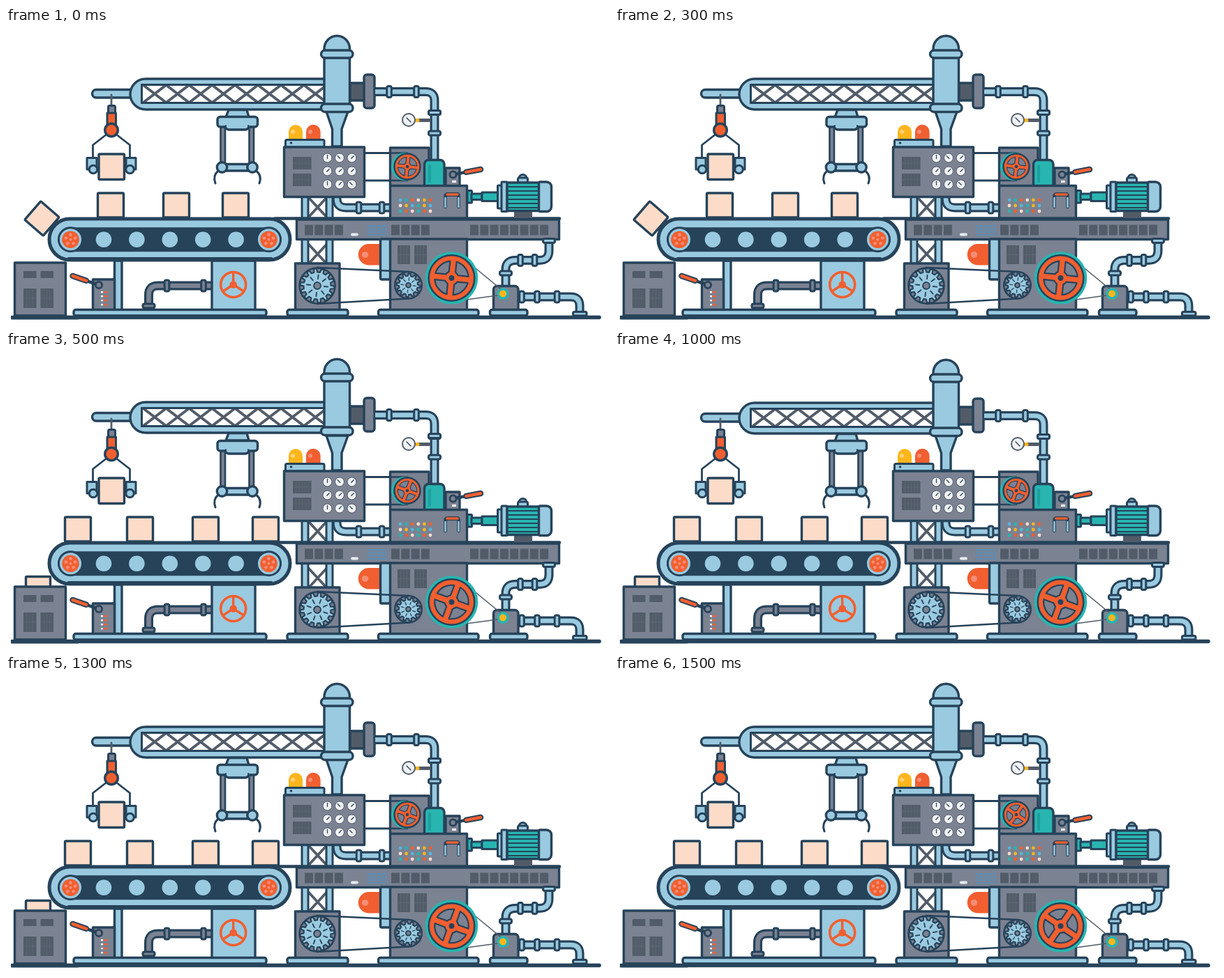
An HTML page with a canvas that plays this animation: 864x425 px, repeating every 2 s.

```html
<!DOCTYPE html>
<html lang="en">
<head>
<meta charset="utf-8">
<title>Conveyor machine</title>
<style>
html, body { margin: 0; width: 100%; height: 100%; overflow: hidden; background: #fff; }
canvas { display: block; }
</style>
</head>
<body>
<canvas id="stage" width="864" height="425"></canvas>
<script>
const ctx = document.getElementById('stage').getContext('2d');
const NAVY = '#26435a', BLUE = '#9acae0', GREY = '#7b8292', DARK = '#525c69',
  ORANGE = '#f15f30', PEACH = '#fcdcc9', TEAL = '#28b5b0', YELLOW = '#fcb61c',
  PINK = '#f58d76', WHITE = '#fff';
const TAU = Math.PI * 2;

function paint(path, fill, stroke = NAVY, width = 3.4) {
  if (fill) { ctx.fillStyle = fill; ctx.fill(path); }
  if (stroke) { ctx.strokeStyle = stroke; ctx.lineWidth = width; ctx.stroke(path); }
}
const shape = (d, ...style) => paint(new Path2D(d), ...style);
const line = (d, color = NAVY, width = 3) => shape(d, null, color, width);
// Corner-to-corner box; the corners are the outline's centre line.
function box(x1, y1, x2, y2, fill, radius = 0, ...style) {
  const p = new Path2D();
  p.roundRect(x1, y1, x2 - x1, y2 - y1, radius);
  paint(p, fill, ...style);
}
const flat = (x1, y1, x2, y2, fill, radius = 0) => box(x1, y1, x2, y2, fill, radius, null);
function disc(x, y, r, fill, ...style) {
  const p = new Path2D();
  p.arc(x, y, r, 0, TAU);
  paint(p, fill, ...style);
}
const dot = (x, y, r, fill) => disc(x, y, r, fill, null);
function pipe(d, fill = BLUE, width = 13) {
  ctx.lineCap = 'butt';
  line(d, NAVY, width);
  line(d, fill, width - 6.4);
  ctx.lineCap = 'round';
}
// Pipe collars: upright on a level run, level on an upright run.
const collarV = (x, y, fill = BLUE) => box(x - 3.3, y - 8, x + 3.3, y + 8, fill, 2.5, NAVY, 3);
const collarH = (x, y, fill = BLUE) => box(x - 8.5, y - 3, x + 8.5, y + 3, fill, 2.5, NAVY, 3);
function at(x, y, angle, draw) {
  ctx.save();
  ctx.translate(x, y);
  ctx.rotate(angle * Math.PI / 180);
  draw();
  ctx.restore();
}
function vents(x, y, count, w = 12, h = 15, step = 14.3) {
  for (let i = 0; i < count; i++) flat(x + i * step, y, x + i * step + w, y + h, DARK);
}
function grille(x1, y1, x2, y2) {
  flat(x1, y1, x2, y2, DARK);
  for (let x = x1 + 4.5; x < x2 - 2; x += 4.5) line(`M${x} ${y1 + 1}V${y2 - 1}`, '#626b78', .7);
  const mid = (y1 + y2) / 2;
  line(`M${x1} ${mid}H${x2}`, '#626b78', .7);
}

function spokeWheel(x, y, r, angle) {
  disc(x, y, r, ORANGE, NAVY, 2.5);
  at(x, y, angle, () => {
    for (let i = 0; i < 4; i++) {
      const a = i * TAU / 4, p = new Path2D();
      p.arc(0, 0, r * .74, a + .19, a + TAU / 4 - .19);
      p.arc(0, 0, r * .3, a + TAU / 4 - .5, a + .5, true);
      p.closePath();
      paint(p, GREY, NAVY, r * .065);
    }
  });
  dot(x, y, r * .12, NAVY);
}
function gear(x, y, r, teeth, angle) {
  at(x, y, angle, () => {
    const p = new Path2D();
    for (let i = 0; i < teeth; i++) {
      const a = i * TAU / teeth, s = TAU / teeth;
      [[-.28, .8], [-.18, 1], [.18, 1], [.28, .8]].forEach(([k, q]) =>
        p.lineTo(Math.cos(a + k * s) * r * q, Math.sin(a + k * s) * r * q));
    }
    p.closePath();
    paint(p, BLUE, NAVY, 2.2);
    for (let i = 0; i < 8; i++) {
      const a = i * TAU / 8, c = Math.cos(a), s = Math.sin(a);
      line(`M${c * r * .4} ${s * r * .4}L${c * r * .63} ${s * r * .63}`, NAVY, r * .075);
    }
    disc(0, 0, r * .2, GREY, NAVY, 2);
  });
}
function carton(x, y, w = 37, h = 35) { box(x, y, x + w, y + h, PEACH, 1.5); }
function lever(x, y, tipX, tipY) {
  const mx = x + (tipX - x) * .48, my = y + (tipY - y) * .48;
  line(`M${x} ${y}L${mx} ${my}`, NAVY, 4.5);
  line(`M${mx} ${my}L${tipX} ${tipY}`, NAVY, 8.5);
  line(`M${mx} ${my}L${tipX} ${tipY}`, ORANGE, 4.5);
  disc(x, y, 4.6, GREY, NAVY, 2.8);
}

function crane() {
  box(123.5, 88.5, 190, 100, BLUE, 6);
  box(178, 73, 458, 117, BLUE, [22, 0, 0, 22]);
  box(194.5, 81.5, 458, 107.5, WHITE, 0, NAVY, 3);
  for (let x = 213; x < 450; x += 32.9) {
    line(`M${x - 15} 83L${x + 15} 106M${x + 15} 83L${x - 15} 106`, DARK, 4);
  }
  line('M194.5 81.5H456M194.5 107.5H456');
  shape('M319 117.5H345L348 128H315Z', BLUE);

  box(493, 79, 514, 104, DARK);
  box(513, 67, 528, 115, GREY, 4);
  shape('M456 34V30A18 18.5 0 0 1 492.5 30V34Z', BLUE);
  box(456, 42, 492.5, 110, BLUE);
  box(451.5, 32, 497, 43, BLUE, 5.5);
  pipe('M529 91.5H601Q614 91.5 614 104V124');
  collarV(549, 91.5);
  collarV(588, 91.5);
}
function gripper() {
  for (const x of [307.5, 348.5]) box(x, 142, x + 6.5, 194, GREY, 0, NAVY, 2.6);
  box(303, 127.5, 360.5, 142, BLUE, 4);
  shape('M315 141V143Q316 146 320 146H343Q347 146 347 141', BLUE);
  flat(316, 138, 346, 143, BLUE);
  box(313, 195.5, 349, 205, BLUE);
  disc(309.5, 200, 7.2, BLUE);
  disc(353, 200, 7.2, BLUE);
  line('M304 205Q296 212 300 223M358.5 205Q367 212 363 223');
}
function hook() {
  line('M151 96V113', DARK, 2.8);
  line('M145 152L124.5 168V187M157 152L177.5 168V187', NAVY, 2.8);
  box(146.5, 111.5, 156.5, 124, GREY, 2, NAVY, 3);
  box(145, 122, 157.5, 142, ORANGE, 0, NAVY, 3);
  disc(151, 146.5, 9.3, ORANGE);
  box(116, 186.5, 130, 203, BLUE, 0, NAVY, 3);
  box(172, 186.5, 186, 203, BLUE, 0, NAVY, 3);
  disc(125, 203, 5.8, BLUE, NAVY, 3);
  disc(177.5, 203, 5.8, BLUE, NAVY, 3);
  carton(133, 181, 36.5, 36.5);
}

function conveyor() {
  box(62, 274, 407, 333, BLUE, 29.5, NAVY, 5);
  line('M90 331.5H380', NAVY, 5);
  box(76, 288, 393, 319.5, NAVY, 16);
  for (let i = 0; i < 5; i++) dot(140 + i * 47.4, 303.7, 11.3, BLUE);
  for (const x of [92.5, 376.5]) {
    disc(x, 303.7, 17, BLUE, NAVY, 3);
    dot(x, 303.7, 12.3, ORANGE);
    for (let i = 0; i < 5; i++) {
      const a = i * TAU / 5 - TAU / 4;
      dot(x + Math.cos(a) * 7, 303.7 + Math.sin(a) * 7, 2.4, PINK);
    }
    dot(x, 303.7, 2, PINK);
  }
}
function conveyorStand() {
  box(155.5, 334, 166, 405, BLUE);
  box(124.5, 361, 155.5, 405, GREY);
  for (let y = 378; y < 400; y += 6) {
    flat(136, y, 139, y + 2.4, WHITE);
    flat(140, y, 145, y + 2.4, ORANGE);
  }
  lever(133, 369, 95.5, 356);
  pipe('M295 370H218Q204.5 370 204.5 383V404', GREY);
  collarV(230.5, 370, GREY);
  collarV(283, 370, GREY);
  collarH(204.5, 399, GREY);
  box(295, 334, 357, 405, BLUE);
  disc(325.7, 368.5, 18, null, ORANGE, 3.6);
  line('M325.7 368.5V351M325.7 368.5L311 378M325.7 368.5L340.5 378', ORANGE, 3.5);
  dot(325.7, 368.5, 5.2, ORANGE);
  box(97, 404.5, 373, 413, BLUE, 3);
}
function cabinet() {
  box(12.5, 337, 85.5, 413, GREY);
  for (const x of [25, 49.5]) {
    flat(x, 349, x + 18.5, 359, DARK);
    grille(x, 374, x + 18.5, 402);
  }
}

function controlTower(angle) {
  for (const y of [244, 311]) line(`M434 ${y}L459 ${y + 27}M459 ${y}L434 ${y + 27}`, DARK, 3.8);
  box(424, 242, 433, 340, BLUE, 0, NAVY, 3);
  box(459, 242, 468, 340, BLUE, 0, NAVY, 3);
  pipe('M474 240V245Q474 258 487 258H552');
  collarV(505.5, 258);
  collarV(538.5, 258);

  shape('M459 120H490L481 145V170H467.5V145Z', BLUE);
  shape('M405 161V149A10 10 0 0 1 425 149V161Z', YELLOW, null);
  shape('M430 161V149A10.3 10.3 0 0 1 450.6 149V161Z', ORANGE, null);
  dot(411, 149, 3, '#fdd276');
  dot(436, 149, 3, PINK);
  box(400.5, 160.5, 456, 171, BLUE, 2, NAVY, 3);
  dot(408.5, 165, 1.8, NAVY);
  box(398.5, 171, 513.5, 242.5, GREY);
  grille(411, 185, 437.5, 203);
  grille(411, 209, 437.5, 227);
  for (let i = 0; i < 9; i++) {
    const x = 460.5 + i % 3 * 17.5, y = 186.5 + Math.floor(i / 3) * 19;
    disc(x, y, 6.5, '#f0f2f4', DARK, 1);
    at(x, y, [0, -45, 45, 40, 45, 45, 0, 40, -45][i], () => line('M0 1V-4', NAVY, 1.3));
  }
  box(414.5, 338, 478, 405, GREY);
  box(403, 404.5, 490, 413, BLUE, 3);
  disc(446, 370, 25.5, null, NAVY, 2.5);
  gear(446, 370, 24.5, 14, angle);
}

function press(angle) {
  line('M514 179.5H575M514 219H575');
  box(550.5, 172, 606, 227, GREY);
  line('M548 179.5H575M548 219H575', NAVY, 2.6);
  dot(572, 199, 20.2, TEAL);
  spokeWheel(575, 199, 18.5, angle);

  pipe('M614 120V192');
  collarH(614, 121.5);
  collarH(614, 151);
  line('M588 132.5H606', DARK, 5);
  line('M588 132.5H590', YELLOW, 5);
  disc(577, 132, 9, '#f0f2f4', DARK, 2);
  line('M580 135L574 129', NAVY, 1.4);
  box(630, 201, 650, 227, GREY);
  flat(639, 219, 645, 222, WHITE);
  lever(640.5, 210.5, 680, 203);
  box(599.5, 189.5, 628, 227, TEAL, [6, 6, 0, 0]);
  flat(605, 196, 609, 222, '#1f9f9d', 2);

  box(550.5, 226.5, 660.5, 274, GREY);
  const lights = ['#53b7df', ORANGE, YELLOW, TEAL, PEACH];
  for (let i = 0; i < 18; i++) {
    dot(565 + i % 6 * 8.6, 247 + Math.floor(i / 6) * 8, 2.4, lights[(i * 3 + Math.floor(i / 5)) % 5]);
  }
  for (const x of [629.5, 648.5]) {
    line(`M${x} 240V257`, NAVY, 4.5);
    line(`M${x} 244V257`, BLUE, 2.4);
  }
  line('M632 239H647', NAVY, 6);
  line('M632 239H647', ORANGE, 3.6);
}
function motor() {
  box(728, 262, 754, 273, DARK, 0, null);
  box(661, 233.5, 667.5, 251, TEAL, 1, NAVY, 3);
  box(667, 238, 682, 246.5, TEAL, 0, NAVY, 3);
  box(682, 236, 705, 248.5, TEAL, 0, NAVY, 3);
  disc(740.5, 216, 5.5, BLUE, NAVY, 3);
  box(733.5, 215, 747.5, 223, BLUE, 2, NAVY, 3);
  box(704.5, 226, 711, 259, BLUE, 1, NAVY, 3);
  box(710, 221, 718, 263.5, BLUE, 1, NAVY, 3);
  box(718, 222, 764, 262.5, TEAL);
  for (let y = 228; y < 261; y += 6) line(`M719 ${y}H763`, NAVY, 2.2);
  box(763.5, 221, 781.5, 263.5, BLUE, [2, 7, 7, 2]);
}
function table() {
  box(416.5, 275, 792.5, 303.5, GREY);
  line('M385 273.5H793', NAVY, 4.5);
  vents(428, 282.5, 4);
  vents(552, 282.5, 4);
  vents(665, 282.5, 8);
  flat(494, 294.5, 505, 298.5, '#e9edf0', 2);
  for (let i = 0; i < 24; i++) {
    const x = 518 + i % 6 * 5, y = 283 + Math.floor(i / 6) * 4.3;
    flat(x, y, x + 3, y + 2.2, '#4a93c8');
  }
}
function driveBase(angle) {
  shape('M537 310H520A15.2 15.2 0 0 0 520 340.5H537Z', ORANGE, null);
  dot(514.5, 325.5, 4.6, PINK);
  box(536.5, 303, 551, 361, BLUE, 2);
  box(550.5, 303, 660.5, 405, GREY);
  grille(561, 312, 579, 339);
  grille(585, 312, 603, 339);
  line('M446 344L577 350M446 396L577 388.5', NAVY, 2.6);
  disc(576.5, 369.3, 19.3, GREY, NAVY, 2.5);
  gear(576.5, 369.3, 17, 12, angle);
  box(533.5, 404.5, 677, 413, BLUE, 3);
  line('M663 337L708 374M660 390L704 384', DARK, 1.6);
  dot(638.5, 359, 37.8, TEAL);
  spokeWheel(638.5, 359, 32.8, angle);
}
function pump() {
  pipe('M716 372V347Q716 333.5 730 333.5H764Q778 333.5 778 320V304');
  collarH(716, 352);
  collarV(737, 333.5);
  collarV(757.5, 333.5);
  collarH(778, 305.5);
  pipe('M734 386H809Q822 386 822 399V412');
  collarV(739, 386);
  collarV(761, 386);
  collarV(789.5, 386);
  box(812.5, 407.5, 832, 413, BLUE, 2, NAVY, 3);
  box(698.5, 370.5, 734, 405, GREY, [5, 5, 0, 0]);
  dot(712, 381.5, 8.6, TEAL);
  dot(712, 381.5, 5, YELLOW);
  box(693.5, 404.5, 747, 413, BLUE, 3);
}

function draw(step) {
  const started = step > 0;
  const angle = [6, 20, 20, 34][step];
  ctx.lineCap = ctx.lineJoin = 'round';
  flat(0, 0, 864, 425, WHITE);

  if (started) {
    if (step < 3) carton(28.5, 322.5, 35, 18);
  } else {
    at(51.5, 273.5, 41, () => carton(-17.5, -17.5, 35, 35));
  }
  (started ? [84.5, 173.5, 267.5, 353.5] : [131.5, 225.5, 310.5]).forEach(x => carton(x, 237));
  cabinet();
  conveyorStand();
  conveyor();

  controlTower(angle);
  press(angle);
  table();
  motor();
  pump();
  driveBase(angle);

  ctx.save();
  ctx.translate(0, step === 1 ? -1 : 0);
  crane();
  box(451.5, 109, 497, 120.5, BLUE, 5.5);
  collarH(614, 121.5);
  ctx.restore();
  gripper();
  hook();
  line('M10 415.5H850', NAVY, 5.5);
  flat(7, 413, 104, 418.5, NAVY);
}

function tick() {
  draw(Math.floor(performance.now() % 2000 / 500));
  requestAnimationFrame(tick);
}
tick();
</script>
</body>
</html>
```
